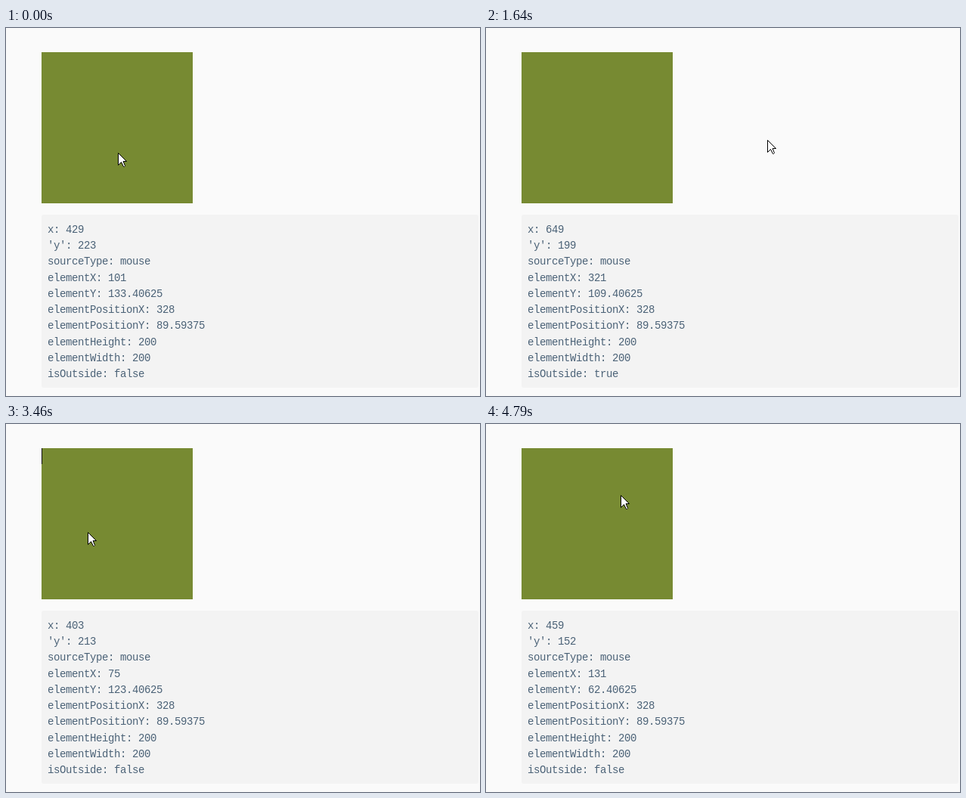
Recreate the animation shown at these times as an HTML page. Size 627 px wide and 487 px high, loop 4.89 s.

```html
<!DOCTYPE html>
<html lang="en">
<head>
<meta charset="utf-8">
<title>Mouse in element</title>
<style>
  html, body { margin: 0; width: 100%; height: 100%; overflow: hidden; background: #fafafa; }
  svg { display: block; }
  text { font: 14px "Liberation Mono", "Courier New", monospace; letter-spacing: -0.4px; fill: #4b6277; }
</style>
</head>
<body>
<svg width="627" height="487" viewBox="0 0 627 487">
  <rect x="47" y="32" width="200" height="200" fill="#778a32"/>
  <rect x="47" y="247" width="578" height="229" rx="3" fill="#f3f3f3"/>
  <g id="lines"></g>
  <rect id="caret" x="47" y="32" width="1" height="21" fill="#111"/>
  <path id="pointer" d="M.5 .5V16.5L4.5 12.5L7.5 18.5H8.5L9.5 17.5L7.1 11.5H11.5Z" fill="#fff" stroke="#000"/>
</svg>
<script>
const LOOP = 4890;
const TEXT_LAG = 30;
const BLINK_START = 50, BLINK = 526;
const SIZE = 200;
const LEFT = 328, TOP = 89.59375;   // element position on the page
const PAGE_X = 281, PAGE_Y = 58;    // page coordinates of the stage corner

// Turning points of the pointer tip: time, x, y
const PATH = [
  [0, 148, 165], [570, 148, 165], [990, 320, 167], [1360, 98, 123],
  [1600, 366, 139], [1640, 372, 148], [1760, 401, 200], [2090, 250, 388],
  [2200, 201, 350], [2230, 167, 341], [2440, 132, 200], [2690, 220, 152],
  [2810, 185, 130], [2920, 197, 112], [3040, 253, 118], [3400, 135, 160],
  [3520, 93, 119], [3820, 137, 43], [4020, 182, 61], [4030, 184, 64],
  [4270, 160, 120], [4500, 214, 100], [4740, 178, 94], [LOOP, 178, 94]
];

const slope = (i, axis) =>
  (PATH[i + 1][axis] - PATH[i][axis]) / (PATH[i + 1][0] - PATH[i][0]);

// Harmonic tangents keep the curve from overshooting its points.
function tangent(i, axis) {
  if (i === 0 || i === PATH.length - 1) return 0;
  const a = slope(i - 1, axis), b = slope(i, axis);
  return a * b <= 0 ? 0 : 2 * a * b / (a + b);
}

function pointerAt(time) {
  const t = Math.max(0, time);
  const i = PATH.findIndex((point, k) => k === PATH.length - 2 || t < PATH[k + 1][0]);
  const from = PATH[i], to = PATH[i + 1];
  const span = to[0] - from[0];
  const u = (t - from[0]) / span, v = 1 - u;
  return [1, 2].map(axis => Math.round(
    from[axis] * v * v * (1 + 2 * u) + to[axis] * u * u * (3 - 2 * u) +
    span * u * v * (tangent(i, axis) * v - tangent(i + 1, axis) * u)
  ));
}

function report([px, py]) {
  const x = px + PAGE_X, y = py + PAGE_Y;
  const ex = x - LEFT, ey = y - TOP;
  const outside = ex < 0 || ey < 0 || ex > SIZE || ey > SIZE;
  return [
    `x: ${x}`, `'y': ${y}`, "sourceType: mouse",
    `elementX: ${ex}`, `elementY: ${ey}`,
    `elementPositionX: ${LEFT}`, `elementPositionY: ${TOP}`,
    `elementHeight: ${SIZE}`, `elementWidth: ${SIZE}`,
    `isOutside: ${outside}`
  ];
}

const pointer = document.getElementById("pointer");
const caret = document.getElementById("caret");
const lines = report(pointerAt(0)).map((_, i) => {
  const line = document.createElementNS("http://www.w3.org/2000/svg", "text");
  line.setAttribute("x", 55);
  line.setAttribute("y", Math.round(270.8 + 21.25 * i));
  return document.getElementById("lines").appendChild(line);
});

function draw(t) {
  pointer.setAttribute("transform", `translate(${pointerAt(t)})`);
  report(pointerAt(t - TEXT_LAG)).forEach((s, i) => { lines[i].textContent = s; });
  const lit = Math.floor((t - BLINK_START) / BLINK) % 2 === 0;
  caret.setAttribute("visibility", lit ? "visible" : "hidden");
}

const start = performance.now();
function tick() {
  draw((performance.now() - start) % LOOP);
  requestAnimationFrame(tick);
}
tick();
</script>
</body>
</html>
```
